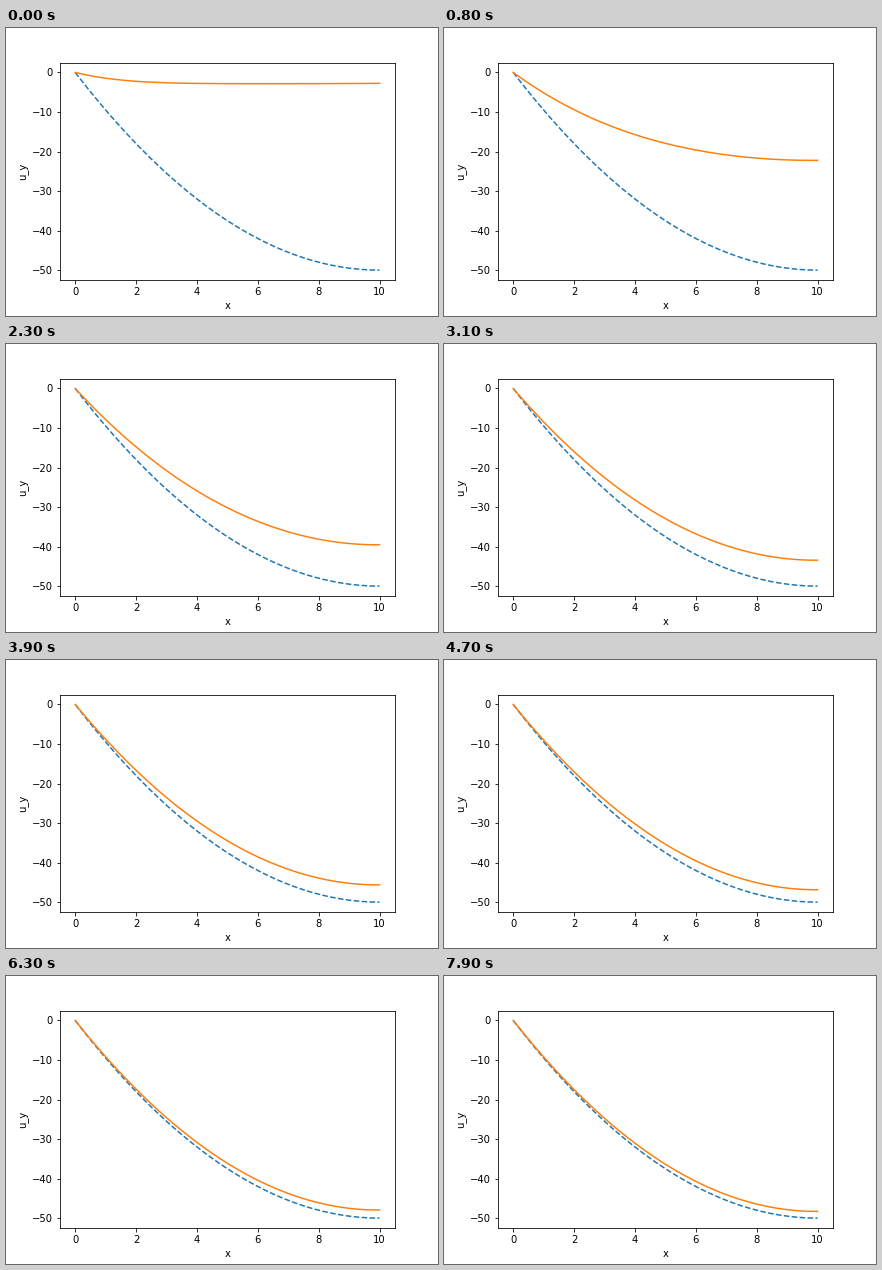
A matplotlib script that plays this animation: 432 px wide and 288 px high, repeating every 8000 ms.

```python
import numpy as np
import matplotlib.pyplot as plt
from matplotlib.animation import FuncAnimation

FRAMES, INTERVAL = 80, 100
L = 10.0        # bar length
LOAD = 0.98     # effective load per stiffness
SLOPE = 0.055   # residual gradient at the free end
RATE = 2.918    # diffusivity per frame

plt.rcParams["font.family"] = "DejaVu Sans"

x = np.linspace(0, L, 101)
n = np.arange(120)
k = (n + 0.5) * np.pi / L
coef = 2 / L * (LOAD / k**3 - SLOPE * (-1.0)**n / k**2)
modes = np.sin(np.outer(x, k))
steady = LOAD * (L * x - x**2 / 2) - SLOPE * x


def displacement(step):
    """Loaded bar relaxing from rest, as a sum of decaying sine modes."""
    return modes @ (coef * np.exp(-RATE * k**2 * step)) - steady


fig, ax = plt.subplots(figsize=(6, 4), dpi=72)
fig.subplots_adjust(bottom=0.125)
ax.plot(x, x**2 / 2 - L * x, "--")
line, = ax.plot(x, displacement(1))
ax.set_xlabel("x")
ax.set_ylabel("u_y")


def update(frame):
    line.set_ydata(displacement(frame + 1))
    return line,


anim = FuncAnimation(fig, update, frames=FRAMES, interval=INTERVAL,
                     repeat=True, repeat_delay=0)
plt.show()
```
